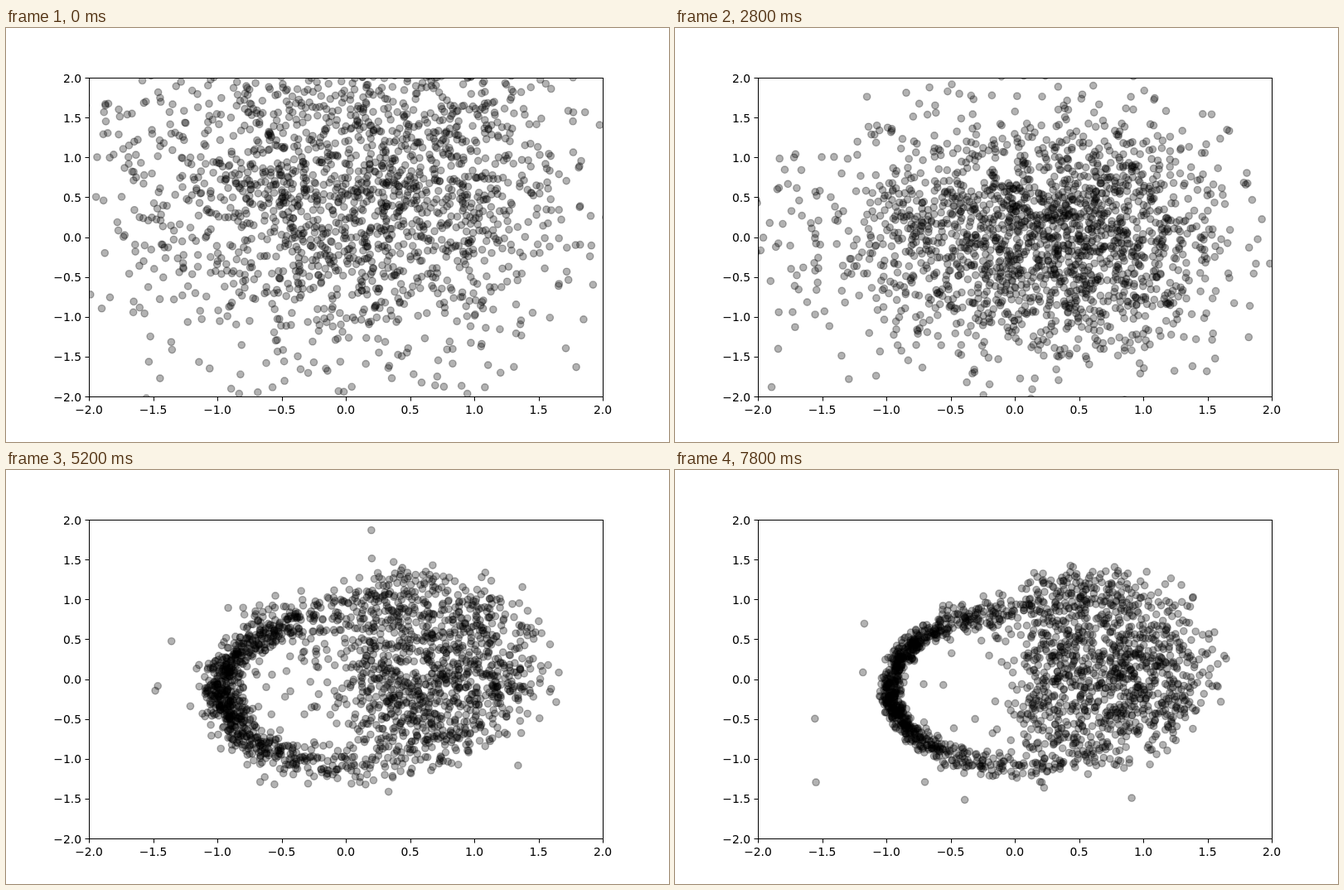
Animation of 800x500 px, one loop 8000 ms. Source, as an HTML page with a canvas:

```html
<!DOCTYPE html>
<html lang="en">
<head>
<meta charset="utf-8">
<title>Samples settling on a ring</title>
<style>
html, body { margin: 0; width: 100%; height: 100%; overflow: hidden; background: #fff; }
canvas { display: block; }
</style>
</head>
<body>
<canvas id="plot" width="800" height="500"></canvas>
<script>
const ctx = document.getElementById('plot').getContext('2d');
const STEP = 200, STEPS = 40, POINTS = 2000;
const BOX = { left: 100, top: 60, width: 620, height: 385 };

function smoothstep(from, to, v) {
  const k = Math.min(1, Math.max(0, (v - from) / (to - from)));
  return k * k * (3 - 2 * k);
}

function randomFrom(seed) {
  let s = Math.imul(seed + 1, 0x9e3779b1);
  return () => {
    s = (s + 0x6d2b79f5) | 0;
    let t = Math.imul(s ^ (s >>> 15), s | 1);
    t ^= t + Math.imul(t ^ (t >>> 7), t | 61);
    return ((t ^ (t >>> 14)) >>> 0) / 4294967296;
  };
}

// A fresh set of samples is drawn at every step: a wide cloud
// that gives way to a sharpening arc and a filled disc.
function makeSampler(step) {
  const rnd = randomFrom(step);
  const normal = () => Math.sqrt(-2 * Math.log(1 - rnd())) * Math.cos(2 * Math.PI * rnd());

  const ring = smoothstep(13, 24, step);
  const cloudShare = 1 - ring * (.82 + .15 * step / STEPS);
  const arcWidth = .03 + .1 * Math.exp((20 - step) / 8);
  const shrink = 1 - .4 * ring;
  const midX = .1 + .008 * step;
  const midY = .65 * Math.exp(-step / 2.5);
  const spreadX = shrink * (.78 + .12 * Math.exp(-step / 6));
  const spreadY = shrink * (.72 + .38 * Math.exp(-step / 8));

  function cloudPoint() {
    const n = normal();
    return [midX + spreadX * n - .07 * shrink * n * n, midY + spreadY * normal()];
  }

  // The angle runs clockwise from the leftmost point.
  function arcPoint() {
    const a = -.1 + 2.35 * (rnd() + rnd() - 1);
    const r = .96 - .13 * Math.sin(a) + .45 * Math.max(0, a - 1.1) ** 2;
    const blur = arcWidth + a * a * (a > 0 ? .04 : .02);
    const d = r + blur * normal();
    return [-d * Math.cos(a), d * Math.sin(a)];
  }

  // The disc leans left at its top and bottom.
  function discPoint() {
    const a = 2 * Math.PI * rnd(), r = rnd() ** .56;
    const u = r * Math.cos(a), v = r * Math.sin(a);
    return [.78 + .72 * u - .3 * v * v + .13 * normal(), .17 + 1.2 * v + .13 * normal()];
  }

  return () => {
    if (rnd() < .003) return [normal(), normal()];
    if (rnd() < cloudShare) return cloudPoint();
    return rnd() < .47 ? arcPoint() : discPoint();
  };
}

const toX = v => BOX.left + (v + 2) / 4 * BOX.width;
const toY = v => BOX.top + (2 - v) / 4 * BOX.height;

function drawPoints(step) {
  const sample = makeSampler(step);
  ctx.save();
  ctx.beginPath();
  ctx.rect(BOX.left, BOX.top, BOX.width, BOX.height);
  ctx.clip();
  ctx.fillStyle = ctx.strokeStyle = 'rgba(0,0,0,.3)';
  ctx.lineWidth = 1.39;
  for (let i = 0; i < POINTS; i++) {
    const [x, y] = sample();
    ctx.beginPath();
    ctx.arc(toX(x), toY(y), 4.17, 0, 2 * Math.PI);
    ctx.fill();
    ctx.stroke();
  }
  ctx.restore();
}

function drawAxes() {
  ctx.strokeStyle = ctx.fillStyle = '#000';
  ctx.lineWidth = 1;
  ctx.strokeRect(BOX.left + .5, BOX.top + .5, BOX.width, BOX.height);
  ctx.font = '13.89px "DejaVu Sans", sans-serif';
  ctx.textBaseline = 'alphabetic';
  ctx.beginPath();
  for (let v = -2; v <= 2; v += .5) {
    const label = v.toFixed(1).replace('-', '\u2212');
    const x = Math.round(toX(v)) + .5, y = Math.round(toY(v)) + .5;
    ctx.moveTo(x, 446);
    ctx.lineTo(x, 450.5);
    ctx.moveTo(100, y);
    ctx.lineTo(95.5, y);
    ctx.textAlign = 'center';
    ctx.fillText(label, toX(v), 466);
    ctx.textAlign = 'right';
    ctx.fillText(label, 91, Math.round(toY(v) + 5.5));
  }
  ctx.stroke();
}

function draw(step) {
  ctx.fillStyle = '#fff';
  ctx.fillRect(0, 0, 800, 500);
  drawPoints(step);
  drawAxes();
}

let shown = -1;
function tick() {
  const step = Math.floor(performance.now() / STEP) % STEPS;
  if (step !== shown) draw(shown = step);
  requestAnimationFrame(tick);
}
tick();
</script>
</body>
</html>
```
